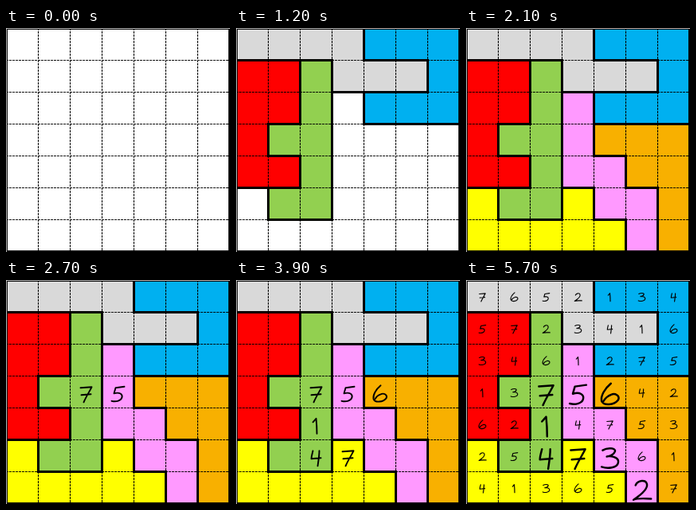
An HTML page for the animation above (6.9 s loop, 281 px wide and 281 px high).

```html
<!DOCTYPE html>
<html lang="en">
<head>
<meta charset="utf-8">
<title>Jigsaw number puzzle</title>
<style>
  html, body { margin: 0; width: 100%; height: 100%; overflow: hidden; background: #fff; }
  svg { display: block; width: 100vw; height: 100vh; }
</style>
</head>
<body>
<svg id="board" viewBox="0 0 281 281" role="img" aria-label="Seven by seven jigsaw number puzzle"></svg>
<script>
const NS = 'http://www.w3.org/2000/svg';
const SIZE = 7, CELL = 40, STEP = 300, LOOP = 6900, SOLVED = 5700;

// One letter per region
const MAP = ['aaaabbb', 'ccdaaab', 'ccdebbb', 'cddefff', 'ccdeeff', 'gddgeef', 'gggggef'];
const ANSWER = ['7652134', '5723416', '3461275', '1375642', '6214753', '2547361', '4136527'];
const COLORS = {
  a: '#d9d9d9', b: '#00b0f0', c: '#ff0000', d: '#92d050',
  e: '#ff99ff', f: '#f8b000', g: '#ffff00'
};
// Row and column of each clue, in order of appearance
const CLUES = ['32', '33', '34', '42', '52', '53', '54', '65'];

// Handwritten digits, 20 units tall, centred on the origin
const DIGITS = {
  1: 'M-4 -5L0 -9.5Q1 0 1 9.5',
  2: 'M-6 -5C-4 -10 4 -11 5 -6C6 -1 -2 5 -8 9C-3 7 3 8 9 8',
  3: 'M-7 -8C-2 -11 6 -10 5 -7C4 -4 0 -2 -3 -2C4 -3 9 0 8 4C7 9 -2 10 -8 8',
  4: 'M-4 -9C-5 -5 -6 -2 -6 1L6 0M4 -9C4 -3 3 3 2 10',
  5: 'M8 -9.5L-3 -8L-5 -1C2 -3 6 0 5 4C4 8 -2 10 -8 8.5',
  6: 'M1 -11C-5 -6 -9 1 -8 6C-6 11 4 10 8 5C10 1 5 -2 1 0C-2 1 -5 4 -6 6',
  7: 'M-7 -8L7 -9C4 -3 0 3 -3 10M-6 1L6 0'
};

const board = document.getElementById('board');

function add(parent, tag, attrs = {}) {
  const node = document.createElementNS(NS, tag);
  for (const key in attrs) node.setAttribute(key, attrs[key]);
  return parent.appendChild(node);
}

function layer(attrs = {}) {
  return add(board, 'g', { 'shape-rendering': 'crispEdges', ...attrs });
}

function show(node, on) {
  node.setAttribute('visibility', on ? 'visible' : 'hidden');
}

add(board, 'rect', { width: 281, height: 281, fill: '#fff' });
const fills = layer();
const dashes = layer({ stroke: '#000', 'stroke-dasharray': '3 1' });
const walls = layer({ stroke: '#000', 'stroke-width': 3, 'stroke-linecap': 'square', fill: 'none' });
const frame = layer();
const ink = { fill: 'none', stroke: '#000', 'stroke-linecap': 'round', 'stroke-linejoin': 'round' };
const clueLayer = add(board, 'g', { ...ink, 'stroke-width': 1.9 });
const restLayer = add(board, 'g', { ...ink, 'stroke-width': 2.2 });

for (let i = 1; i < SIZE; i++) {
  const p = i * CELL + 0.5;
  add(dashes, 'path', { d: `M0 ${p}H281M${p} 0V281` });
}

// Inner walls of a cell, where the neighbour belongs to another region
function cellWalls(r, c) {
  const id = MAP[r][c], x = c * CELL + 0.5, y = r * CELL + 0.5;
  const differs = (row, col) => MAP[row] && MAP[row][col] && MAP[row][col] !== id;
  let d = '';
  if (differs(r - 1, c)) d += `M${x} ${y}h${CELL}`;
  if (differs(r + 1, c)) d += `M${x} ${y + CELL}h${CELL}`;
  if (differs(r, c - 1)) d += `M${x} ${y}v${CELL}`;
  if (differs(r, c + 1)) d += `M${x + CELL} ${y}v${CELL}`;
  return d;
}

const regions = Object.keys(COLORS).map(id => {
  const fill = add(fills, 'g', { fill: COLORS[id] });
  let d = '';
  MAP.forEach((row, r) => [...row].forEach((cell, c) => {
    if (cell !== id) return;
    add(fill, 'rect', { x: c * CELL, y: r * CELL, width: CELL + 1, height: CELL + 1 });
    d += cellWalls(r, c);
  }));
  return [fill, add(walls, 'path', { d })];
});

add(frame, 'path', { d: 'M0 0H281V1H1V281H0Z', fill: '#bbb' });
add(frame, 'path', { d: 'M1 1H281V281H1ZM2 2V279H279V2Z', 'fill-rule': 'evenodd' });

function place(node, r, c, scale, drop) {
  const x = c * CELL + 20.5, y = r * CELL + drop;
  node.setAttribute('transform', `translate(${x} ${y}) scale(${scale})`);
}

const clues = CLUES.map(([r, c]) => ({
  r: +r, c: +c, node: add(clueLayer, 'path', { d: DIGITS[ANSWER[r][c]] })
}));

ANSWER.forEach((row, r) => [...row].forEach((digit, c) => {
  if (CLUES.includes(`${r}${c}`)) return;
  place(add(restLayer, 'path', { d: DIGITS[digit] }), r, c, 0.53, 21.7);
}));

function draw(time) {
  const t = time % LOOP;
  const step = Math.floor(t / STEP);
  const solved = t >= SOLVED;
  regions.forEach((parts, i) => parts.forEach(part => show(part, step > i)));
  clues.forEach(({ r, c, node }, i) => {
    show(node, step > regions.length + i);
    place(node, r, c, solved ? 1.3 : 1, solved ? 24 : 23.3);
  });
  show(restLayer, solved);
}

const start = performance.now();
function tick() {
  draw(performance.now() - start);
  requestAnimationFrame(tick);
}
tick();
</script>
</body>
</html>
```
